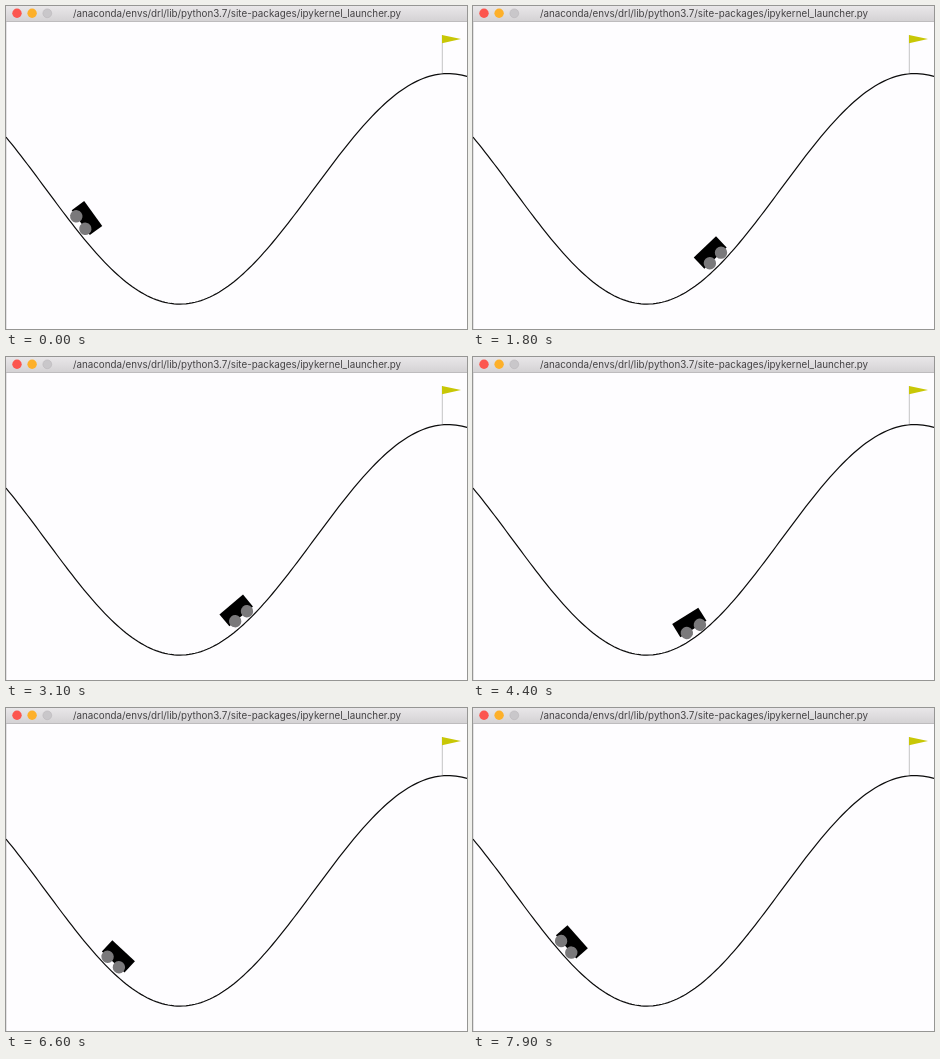
An HTML page for the animation above (8000 ms loop, 461x323 px).

```html
<!DOCTYPE html>
<html lang="en">
<head>
<meta charset="utf-8">
<title>Mountain car</title>
<style>
  html, body { margin: 0; width: 100%; height: 100%; overflow: hidden; background: #fefdff; }
  svg { display: block; width: 461px; height: 323px; }
  text { font: 9.8px Inter, Roboto, sans-serif; fill: #454345; }
</style>
</head>
<body>
<svg viewBox="0 0 461 323">
  <defs>
    <linearGradient id="bar" x2="0" y2="1">
      <stop stop-color="#e9e7e9"/>
      <stop offset="1" stop-color="#d3d1d3"/>
    </linearGradient>
  </defs>
  <rect width="461" height="323" fill="#fefdff"/>
  <path d="M.5 16V323" stroke="#e4e3e5"/>
  <path id="hill" fill="none" stroke="#0c0c0c" stroke-width="1.2"/>
  <path d="M436.3 29V67" stroke="#c4c3c5"/>
  <path d="M436 29.1V37.2L455 33.1Z" fill="#c8c706"/>
  <g id="car">
    <rect x="-15.4" y="-23" width="30.8" height="15.4"/>
    <circle cx="-7.7" cy="-7.7" r="6.2" fill="#7a797b"/>
    <circle cx="7.7" cy="-7.7" r="6.2" fill="#7a797b"/>
  </g>
  <rect width="461" height="16" fill="url(#bar)"/>
  <path d="M0 15.5H461" stroke="#bebcbe"/>
  <circle cx="11" cy="7.3" r="4.7" fill="#fc564f"/>
  <circle cx="26.1" cy="7.3" r="4.7" fill="#fdb02a"/>
  <circle cx="41.3" cy="7.3" r="4.4" fill="#c9c7ca" stroke="#bab8bb" stroke-width=".6"/>
  <text x="231" y="11.2" text-anchor="middle">/anaconda/envs/drl/lib/python3.7/site-packages/ipykernel_launcher.py</text>
</svg>
<script>
  const LOOP = 8000, STEP = 100, SCALE = 461 / 1.8;
  const LEFT = 0.6, BOTTOM = 323.7;
  const MIDDLE = 173, REACH = 104.4;
  // time in ms, swings completed since the left turning point
  const swings = [[0, 0], [1800, 1.377], [3100, 2.361], [4400, 3.332],
                  [5700, 4.1755], [6600, 4.869], [7900, 5.903]];
  const car = document.getElementById("car");

  const world = px => (px - LEFT) / SCALE - 1.2;
  const ground = px => BOTTOM - (Math.sin(3 * world(px)) * 0.45 + 0.55) * SCALE;

  let d = "";
  for (let px = 0; px <= 462; px += 3) d += `${px ? "L" : "M"}${px} ${ground(px).toFixed(2)}`;
  document.getElementById("hill").setAttribute("d", d);

  function phase(t) {
    const i = Math.max(1, swings.findIndex(s => s[0] >= t));
    const [t0, p0] = swings[i - 1], [t1, p1] = swings[i];
    return p0 + (p1 - p0) * (t - t0) / (t1 - t0);
  }

  function draw(now) {
    const t = Math.floor(now % LOOP / STEP) * STEP;
    const px = MIDDLE - REACH * Math.cos(2 * Math.PI * phase(t));
    const tilt = -Math.cos(3 * world(px)) * 180 / Math.PI;
    car.setAttribute("transform", `translate(${px} ${ground(px)}) rotate(${tilt})`);
    requestAnimationFrame(draw);
  }
  draw(performance.now());
</script>
</body>
</html>
```
